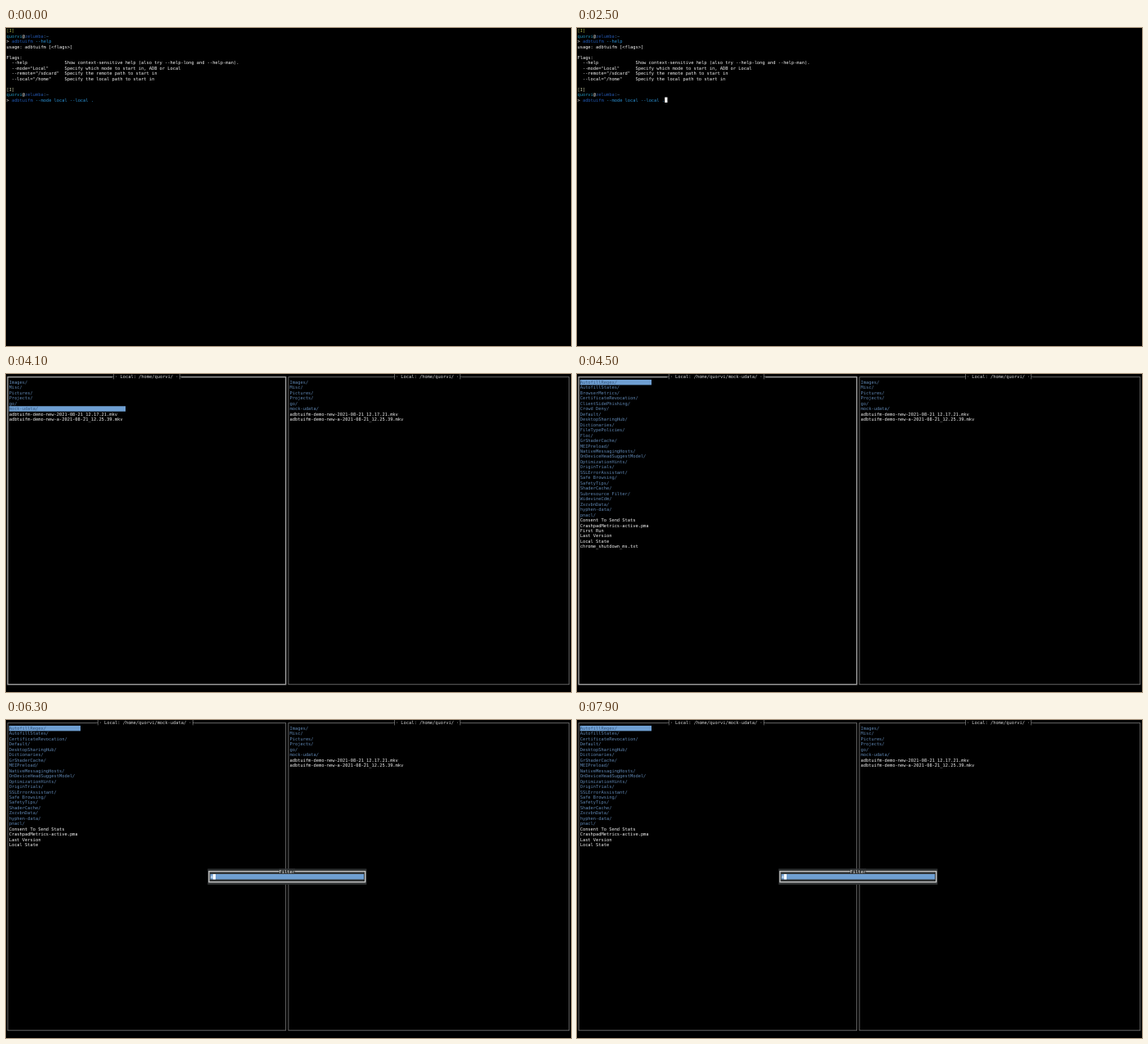
Recreate the animation shown at these times as an HTML page. Size 690 by 388 pixels, loop 8 s.

```html
<!DOCTYPE html>
<html lang="en">
<head>
<meta charset="utf-8">
<title>Terminal file manager</title>
<style>
  html, body { margin: 0; width: 100%; height: 100%; overflow: hidden; background: #000; }
  svg { display: block; width: 100vw; height: 100vh; }
  text {
    font: 5.372px "DejaVu Sans Mono", monospace;
    white-space: pre;
    text-rendering: geometricPrecision;
  }
</style>
</head>
<body>
<svg id="screen" viewBox="0 0 690 388" preserveAspectRatio="none"></svg>
<script>
const LOOP = 8000;
const CW = 690 / 1920 * 9, CH = 388 / 60; // terminal cell
const PAD = .45;                          // terminal padding
const WHITE = '#f2f2f2', DIR = '#5f86b2', BAR = '#6f9fd2';
const HOME = '/home/quorvi/';

const homeFiles = ['Images/', 'Misc/', 'Pictures/', 'Projects/', 'go/', 'mock-udata/',
  'adbtuifm-demo-new-2021-08-21_12.17.21.mkv',
  'adbtuifm-demo-new-a-2021-08-21_12.25.39.mkv'];

const dataFiles = ['AutofillRegex/', 'AutofillStates/', 'BrowserMetrics/',
  'CertificateRevocation/', 'ClientSidePhishing/', 'Crowd Deny/', 'Default/',
  'DesktopSharingHub/', 'Dictionaries/', 'FileTypePolicies/', 'Floc/', 'GrShaderCache/',
  'MEIPreload/', 'NativeMessagingHosts/', 'OnDeviceHeadSuggestModel/',
  'OptimizationHints/', 'OriginTrials/', 'SSLErrorAssistant/', 'Safe Browsing/',
  'SafetyTips/', 'ShaderCache/', 'Subresource Filter/', 'WidevineCdm/', 'ZxcvbnData/',
  'hyphen-data/', 'pnacl/', 'Consent To Send Stats', 'CrashpadMetrics-active.pma',
  'First Run', 'Last Version', 'Local State', 'chrome_shutdown_ms.txt'];

const helpLines = ['usage: adbtuifm [<flags>]', '', 'Flags:',
  '  --help              Show context-sensitive help (also try --help-long and --help-man).',
  '  --mode="Local"      Specify which mode to start in, ADB or Local',
  '  --remote="/sdcard"  Specify the remote path to start in',
  '  --local="/home"     Specify the local path to start in'];

// Each step: start time and the state fields it changes.
const steps = [
  [0, { view: 'shell', cursor: false }],
  [100, { cursor: true }],
  [700, { cursor: false }],
  [1300, { cursor: true }],
  [1900, { cursor: false }],
  [2400, { cursor: true }],
  [2600, { view: 'panes', dir: 'home', row: 0, query: null }],
  [3300, { row: 1 }],
  [3500, { row: 2 }],
  [3900, { row: 3 }],
  [4000, { row: 4 }],
  [4100, { row: 5 }],
  [4300, { dir: 'data', row: 0 }],
  [5700, { query: '' }],
  [6200, { query: 'a' }]
];

const escapeText = s => s.replace(/&/g, '&amp;').replace(/</g, '&lt;');

const text = (col, row, str, fill = WHITE) =>
  `<text x="${col * CW}" y="${row * CH + 5}" fill="${fill}">${escapeText(str)}</text>`;

const cells = (col, row, cols, rows, fill) =>
  `<rect x="${col * CW}" y="${row * CH}" width="${cols * CW}" height="${rows * CH}" fill="${fill}"/>`;

const frame = (col, row, cols, rows, stroke, width) =>
  `<rect x="${(col + .5) * CW}" y="${(row + .5) * CH}" width="${(cols - 1) * CW}"
    height="${(rows - 1) * CH}" fill="none" stroke="${stroke}" stroke-width="${width}"/>`;

// Draws coloured pieces one after another on a row.
function run(row, ...parts) {
  let col = 0, out = '';
  for (const [str, fill] of parts) {
    out += text(col, row, str, fill);
    col += str.length;
  }
  return out;
}

const prompt = row =>
  run(row, ['quorvi', '#2291b8'], ['@', WHITE], ['zelumba', '#2456ad'], [':~', '#4f7fae']);

const command = (row, args) =>
  run(row, ['> ', WHITE], ['adbtuifm', '#1f57b0'], [' ' + args, '#2a8fd0']);

function shell({ cursor }) {
  return text(0, 0, '[I]', '#a8b54a') + prompt(1) + command(2, '--help') +
    helpLines.map((line, i) => text(0, 3 + i, line)).join('') +
    text(0, 11, '[I]', '#c4c6a0') + prompt(12) + command(13, '--mode local --local .') +
    (cursor ? cells(33, 13, 1, 1, '#fff') : '');
}

function pane(col, cols, path, files, selected, focused) {
  const title = `┤· Local: ${path} ·├`;
  const titleCol = col + Math.floor((cols - title.length) / 2);
  const barCols = Math.max(...files.map(f => f.length)) + 1;
  let out = frame(col, 0, cols, 59, focused ? '#a0a0a0' : '#707070', focused ? 1.4 : .9) +
    cells(titleCol, 0, title.length, 1, '#000') + text(titleCol, 0, title, '#d8d8d8');
  files.forEach((name, i) => {
    const active = i === selected;
    if (active) out += cells(col + 1, i + 1, barCols, 1, BAR);
    out += text(col + 1, i + 1, name, active ? '#36577f' : name.endsWith('/') ? DIR : WHITE);
  });
  return out;
}

function filterBox(query) {
  return cells(76, 28, 60, 3, '#303334') + frame(76, 28, 60, 3, '#c4c4c4', 1.4) +
    cells(103, 28, 6, 1, '#303334') + text(103, 28, 'Filter') +
    cells(77, 29, 58, 1, BAR) + text(77, 29, query, '#e4ecf4') +
    cells(77 + query.length, 29, 1, 1, '#fff');
}

function panes({ dir, row, query }) {
  const filtering = query !== null;
  const inHome = dir === 'home';
  const files = inHome ? homeFiles : dataFiles.filter(f => f.toLowerCase().includes(query || ''));
  return pane(0, 106, HOME + (inHome ? '' : 'mock-udata/'), files, row, !filtering) +
    pane(106, 107, HOME, homeFiles, -1, false) +
    (filtering ? filterBox(query) : '');
}

const screen = document.getElementById('screen');
let shown = -1;

function update(now) {
  const t = now % LOOP;
  const count = steps.filter(([start]) => start <= t).length;
  if (count !== shown) {
    shown = count;
    const state = Object.assign({}, ...steps.slice(0, count).map(s => s[1]));
    screen.innerHTML = `<rect width="690" height="388"/><g transform="translate(${PAD} ${PAD})">` +
      (state.view === 'shell' ? shell(state) : panes(state)) + '</g>';
  }
}

const begin = performance.now();
function tick() {
  update(performance.now() - begin);
  requestAnimationFrame(tick);
}
tick();
</script>
</body>
</html>
```
